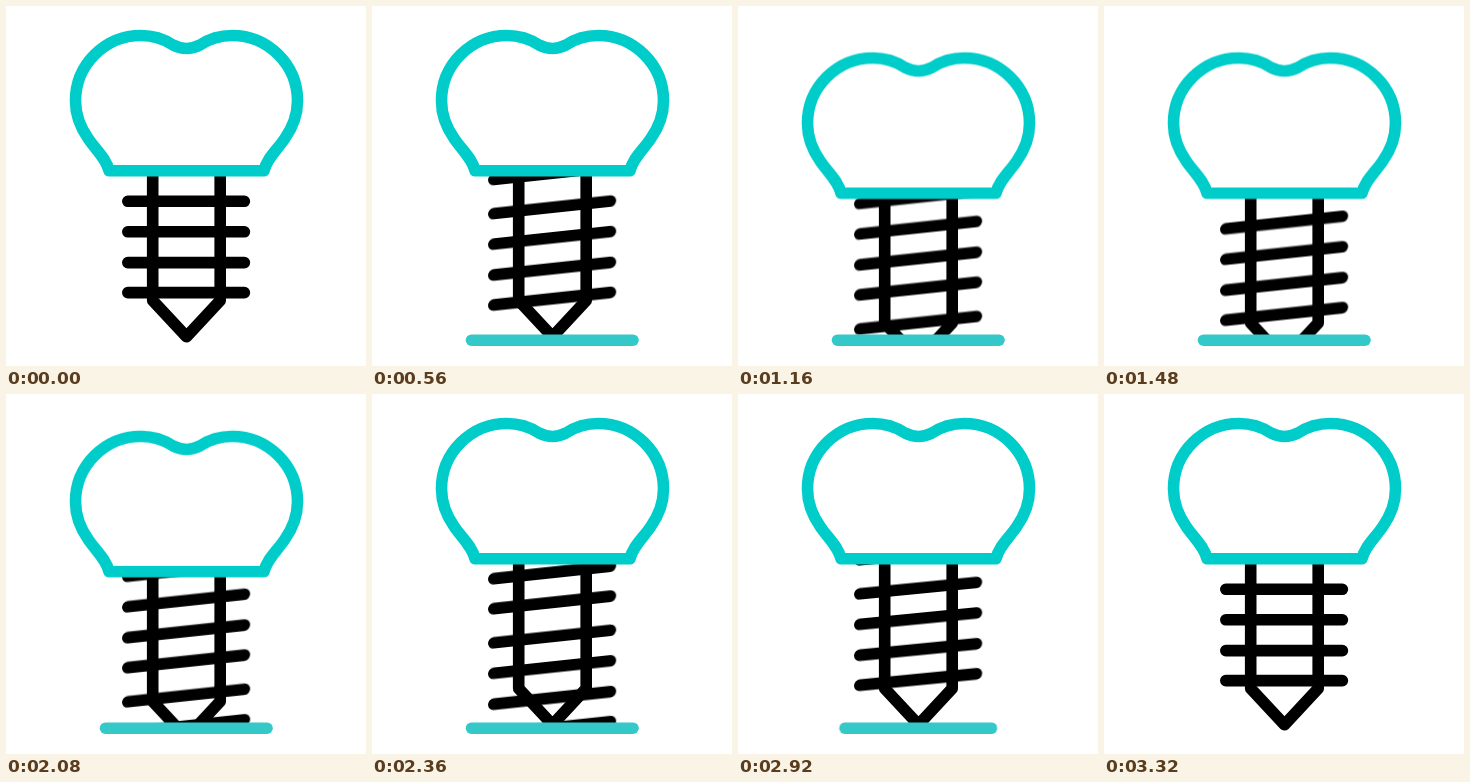
Animation of 360 by 360 pixels, one loop 3480 ms. Source, as an HTML page without scripts:

```html
<!DOCTYPE html>
<html lang="en">
<head>
<meta charset="utf-8">
<title>Dental implant</title>
<style>
  html, body { margin: 0; width: 100%; height: 100%; overflow: hidden; background: #fff; }
  svg { display: block; width: 100vw; height: 100vh; }
  path, line { fill: none; stroke-width: 11.6; stroke-linecap: round; stroke-linejoin: round; }
  .screw { stroke: #000; }
  .crown { stroke: #00cdca; }
  .gum { stroke: #34c9c8; }

  .tooth, .tilt, .spin, .gum { animation: 3480ms linear infinite; }
  .tooth { animation-name: sink; }
  .tilt { animation-name: tilt; transform-origin: 180px 0; }
  .spin { animation-name: spin; }
  .gum { animation-name: gum; transform-origin: 180px 334px; }

  /* the whole tooth goes down into the gum and back up */
  @keyframes sink {
    0%, 16.09% { transform: translateY(0); animation-timing-function: cubic-bezier(.37, 0, .63, 1); }
    28.74%, 53.45% { transform: translateY(22.5px); animation-timing-function: cubic-bezier(.37, 0, .63, 1); }
    67.39%, 100% { transform: translateY(0); }
  }
  /* threads slant before turning, level out afterwards */
  @keyframes tilt {
    0%, 1.72% { transform: translateY(0) skewY(0deg); animation-timing-function: ease-in-out; }
    14.37%, 81.03% { transform: translateY(-1.2px) skewY(-6.1deg); animation-timing-function: ease-in-out; }
    95.11%, 100% { transform: translateY(0) skewY(0deg); }
  }
  /* one full set of threads passes by */
  @keyframes spin {
    0%, 14.37% { transform: translateY(0); animation-timing-function: cubic-bezier(.3, .25, .65, .92); }
    41.95%, 53.45% { transform: translateY(125.5px); animation-timing-function: cubic-bezier(.3, .25, .65, .92); }
    81.03%, 100% { transform: translateY(0); }
  }
  @keyframes gum {
    0%, 1.72% { transform: scaleX(0); opacity: 0; animation-timing-function: ease-in-out; }
    2.5% { opacity: 1; }
    14.37%, 81.03% { transform: scaleX(1); opacity: 1; animation-timing-function: ease-in-out; }
    94.3% { opacity: 1; }
    95.11%, 100% { transform: scaleX(0); opacity: 0; }
  }
</style>
</head>
<body>
<svg viewBox="0 0 360 360">
  <defs>
    <clipPath id="above"><rect width="360" height="338"/></clipPath>
    <clipPath id="below"><rect y="164" width="360" height="196"/></clipPath>
    <path id="threads" d="M121.8 195.3H238.4M121.8 225.8H238.4M121.8 256.6H238.4M121.8 286.6H238.4"/>
  </defs>

  <g clip-path="url(#above)">
    <g class="tooth">
      <g class="screw" clip-path="url(#below)">
        <path d="M146.7 165V294.5L180.5 330.8L214.2 294.5V165"/>
        <g class="tilt">
          <g class="spin">
            <use href="#threads"/>
            <use href="#threads" y="-125.5"/>
          </g>
        </g>
      </g>
      <path class="crown" d="M103 164.7
        C100 152 90 144 82.5 133C74 121 69.5 108 69.5 95
        A65.5 65.5 0 0 1 135 29.5C146 29.5 158 33 167 39
        Q174 42.5 180.5 42.5Q187 42.5 194 39
        C203 33 214 29.5 226 29.5A65.5 65.5 0 0 1 291.5 95
        C291.5 108 287 121 278.5 133C271 144 261 152 258 164.7Z"/>
    </g>
  </g>

  <line class="gum" x1="99.5" y1="334.2" x2="261" y2="334.2"/>
</svg>
</body>
</html>
```
